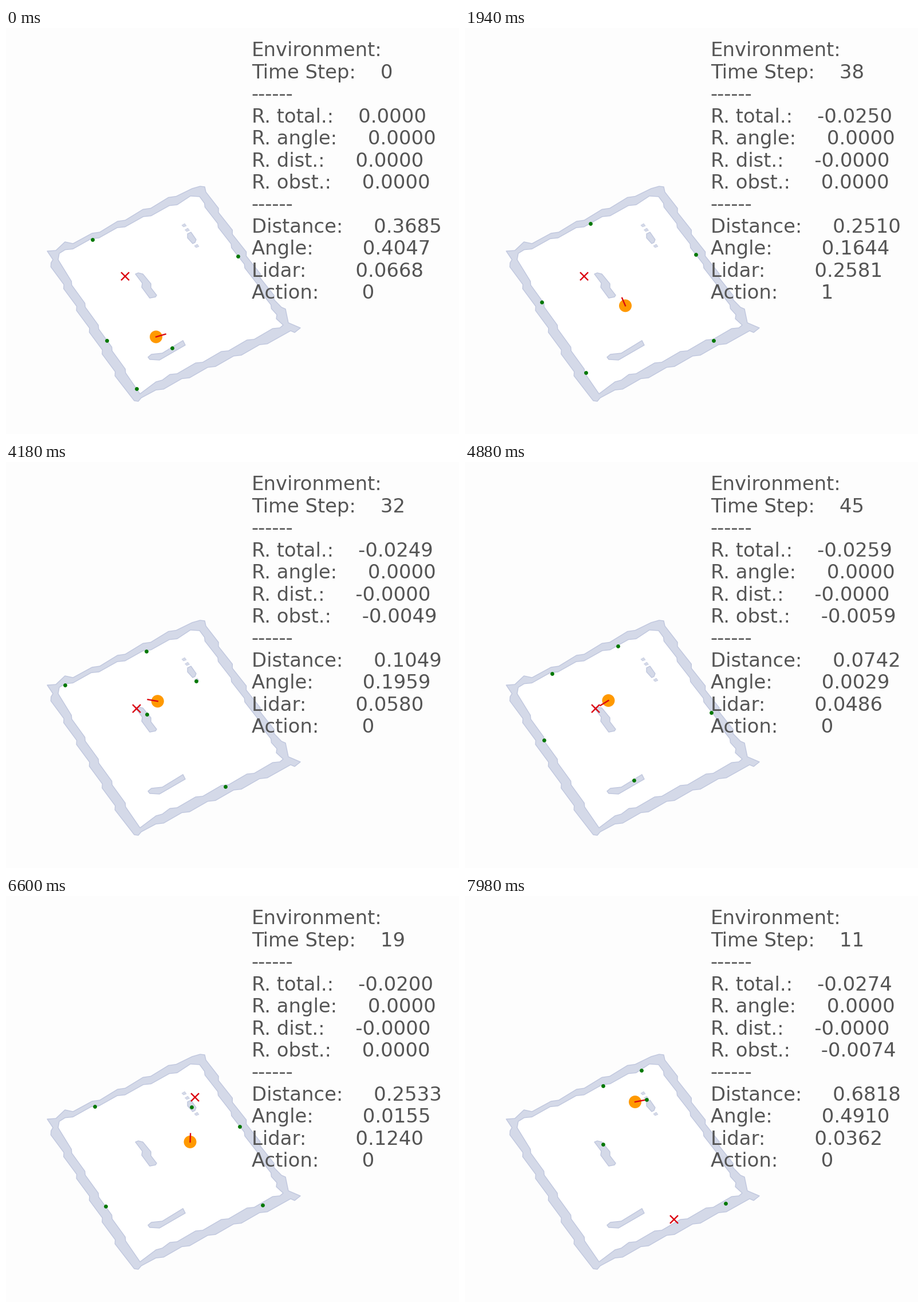
These frames come from a looping animation (791x708 px, 8000 ms). A matplotlib script:

```python
import numpy as np
import matplotlib.pyplot as plt
from matplotlib.animation import FuncAnimation
from matplotlib.patches import Circle, Polygon

W, H, DPI = 791, 708, 100
PX = 72 / DPI                       # points per pixel
UNIT = np.array([381, -310.5])      # pixels per map unit, y up
RAYS = np.radians(67.5) * np.arange(-2, 3)
WALL, EDGE = "#d4d9e8", "#c0c7de"

# start ms, ms per step, target, needle at reset,
# keys: step, x, y, heading, lidar
EPISODES = [
    (0, 51, (208, 433), 19.5, [
        (0, 262, 538.617, 185.465, .0668),
        (13, 262, 538.617, 75, .071),
        (34, 280, 484.293, 75, .221),
        (38, 280, 484.293, 109.249, .2581),
        (42, 280, 484.293, 138, .05),
        (48, 266, 474, 138, .02)]),
    (2500, 52.4, (228, 430), 138, [
        (0, 356, 447, 153.229, .101),
        (8, 333, 436.958, 153.229, .1615),
        (20, 297, 422, 153.229, .121),
        (22, 297, 422, 167.879, .119),
        (32, 264.751, 417.2, 167.879, .058),
        (36, 252, 415, 167.879, .056),
        (44, 252, 415, 217, .05),
        (58, 230, 428.5, 217, .03)]),
    (5560, 53, (329.5, 350.5), 217, [
        (1, 319.5, 479.224, 84.055, .1381),
        (19, 321.5, 428.879, 88.035, .124),
        (34, 323.5, 388, 88.035, .031)]),
    (7400, 51, (364.5, 563.5), 88, [
        (0, 261.5, 368, 13.441, .101),
        (11, 297, 359.073, 13.441, .0362)]),
]

# Lines on which the laser beams end
BEAM_STOPS = [
    [(83.5, 397), (335.6, 292), (486.8, 522.4), (229.9, 631.6), (83.5, 397)],
    [(232, 431), (241, 432), (253, 453), (259, 468)],
    [(254, 575), (270, 569), (308, 548)],
    [(310, 344), (317, 356), (334, 386)],
]
SEG_A = np.array([p for line in BEAM_STOPS for p in line[:-1]], float)
SEG_D = np.array([p for line in BEAM_STOPS for p in line[1:]], float) - SEG_A


def kinks(p, q, n, w, d=2):
    """n small jogs evenly spread between p and q."""
    p, q = np.array(p, float), np.array(q, float)
    u = (q - p) / np.hypot(*(q - p))
    out = np.array([u[1], -u[0]]) * d
    pts = []
    for k in np.linspace(0, 1, n):
        m = p + (q - p) * k
        pts += [m - u * w + out, m + u * w - out]
    return [tuple(v) for v in pts]


def cross(a, b):
    return a[..., 0] * b[..., 1] - a[..., 1] * b[..., 0]


def heading_vector(deg):
    a = np.radians(deg)
    return np.array([np.cos(a), np.sin(a)])


def cast(pos, heading):
    """Ends of the five laser beams."""
    ends = []
    for a in heading + np.degrees(RAYS):
        ray = heading_vector(a) * UNIT
        den = cross(ray, SEG_D)
        t = cross(SEG_A - pos, SEG_D) / den
        s = cross(SEG_A - pos, ray) / den
        hit = t[(t > 0) & (s >= 0) & (s <= 1)]
        if len(hit):
            ends.append(pos + ray * hit.min())
    return np.array(ends)


def state(keys, step):
    table = np.array(keys, float)
    return np.array([np.interp(step, table[:, 0], c) for c in table.T[1:]])


fig = plt.figure(figsize=(W / DPI, H / DPI), dpi=DPI, facecolor="#fdfdfd")
ax = fig.add_axes([0, 0, 1, 1])
ax.set_xlim(0, W)
ax.set_ylim(H, 0)
ax.axis("off")


def shape(pts, face=WALL, lw=1.4):
    ax.add_patch(Polygon(pts, fc=face, ec=EDGE, lw=lw * PX, joinstyle="round"))


# Outer and inner outline of the walls
shape([(72, 389), (87, 388), (103, 373), (117, 376)]
      + kinks((157, 357), (290.5, 294.5), 4, 6.5)
      + [(325, 280), (339, 276), (347, 277), (349, 286)]
      + kinks((371, 318), (468, 470), 5, 3)
      + [(481, 487), (488, 490), (493, 514), (514, 523), (504, 531), (497, 528)]
      + kinks((449.5, 551.5), (268.5, 630.5), 5, 6.5)
      + [(236, 645), (231, 651), (224, 650)]
      + kinks((190.5, 603), (78.5, 413), 6, 3)
      + [(82, 404)])
shape([(93, 393)]
      + kinks((110, 386), (292, 309), 5, 6.5)
      + [(322, 293), (338, 294)]
      + kinks((347, 309), (463, 486), 6, 3, 1.5)
      + [(473, 500), (472, 507), (484, 518)]
      + kinks((472, 523.5), (292.5, 603.5), 5, 6)
      + [(273, 614), (262, 617), (234, 638)]
      + kinks((208.5, 598), (114.5, 445), 5, 3, 1.5)
      + [(91, 404)], "white")

# Obstacles
shape([(226, 429), (231, 427), (239, 429), (253, 446), (253, 453),
       (263, 466), (261, 469), (251, 471), (237, 452), (238, 445)])
shape([(248, 574), (254, 569), (273, 567), (309, 545), (313, 553),
       (268, 579), (251, 578)])
shape([(317, 359), (323, 356), (332, 369), (330, 374), (326, 376), (317, 366)])
for x, y in [(311, 344), (316.5, 352), (333, 380)]:
    shape([(x - 4, y), (x + 1, y - 3), (x + 4, y + 1), (x - 1, y + 3)], lw=.6)

ax.plot([0, W], [H - .5, H - .5], color="#666666", lw=PX)

goal, = ax.plot([], [], "x", color="#dc0010", ms=13.5 * PX, mew=2.4 * PX, zorder=3)
robot = ax.add_patch(Circle((0, 0), 11, fc="#ff9900", lw=0, zorder=4))
needle, = ax.plot([], [], color="#dc0a10", lw=2.4 * PX, zorder=5)
dots, = ax.plot([], [], "o", color="#007800", ms=6.8 * PX, mew=0, zorder=6)
lines = [ax.text(428.7, 49.3 + 38.45 * i, "", fontsize=33.9 * PX, color="#555555",
                 family="DejaVu Sans", va="baseline", zorder=7) for i in range(12)]


def readout(step, keys, target):
    x, y, heading, lidar = state(keys, step)
    gap = (np.array(target) - (x, y)) / UNIT
    bearing = np.degrees(np.arctan2(gap[1], gap[0]))
    angle = abs((heading - bearing + 180) % 360 - 180) / 180
    total = obst = 0.0
    action, r_dist = 0, "0.0000"
    if step:
        turn = heading - state(keys, step - 1)[2]
        action = 1 if turn > 2 else 2 if turn < -2 else 0
        obst = min(0.0, .1155 * (lidar - .1))
        total = -.02 - .005 * (action > 0) + obst
        r_dist = "-0.0000"
    return ["Environment:",
            f"Time Step:    {step}",
            "------",
            f"R. total.:    {total:.4f}",
            "R. angle:     0.0000",
            f"R. dist.:     {r_dist}",
            f"R. obst.:     {obst:.4f}",
            "------",
            f"Distance:     {np.hypot(*gap):.4f}",
            f"Angle:        {angle:.4f}",
            f"Lidar:        {lidar:.4f}",
            f"Action:       {action}"]


def draw(i):
    # The picture refreshes at 0, 20 and 120 ms of every 140 ms
    cycle, phase = divmod(i * 20, 140)
    t = cycle * 140 + (0 if phase < 20 else 20 if phase < 120 else 120)
    start, pace, target, reset, keys = [e for e in EPISODES if e[0] <= t][-1]
    step = int((t - start) / pace)
    x, y, heading = state(keys, step)[:3]
    pos = np.array([x, y])

    goal.set_data([target[0]], [target[1]])
    robot.center = (x, y)
    tip = pos + .046 * heading_vector(heading if step else reset) * UNIT
    needle.set_data([x, tip[0]], [y, tip[1]])
    dots.set_data(*cast(pos, heading).T)
    for line, text in zip(lines, readout(step, keys, target)):
        line.set_text(text)
    return [goal, robot, needle, dots, *lines]


anim = FuncAnimation(fig, draw, frames=400, interval=20, repeat=True, repeat_delay=0)
plt.show()
```
